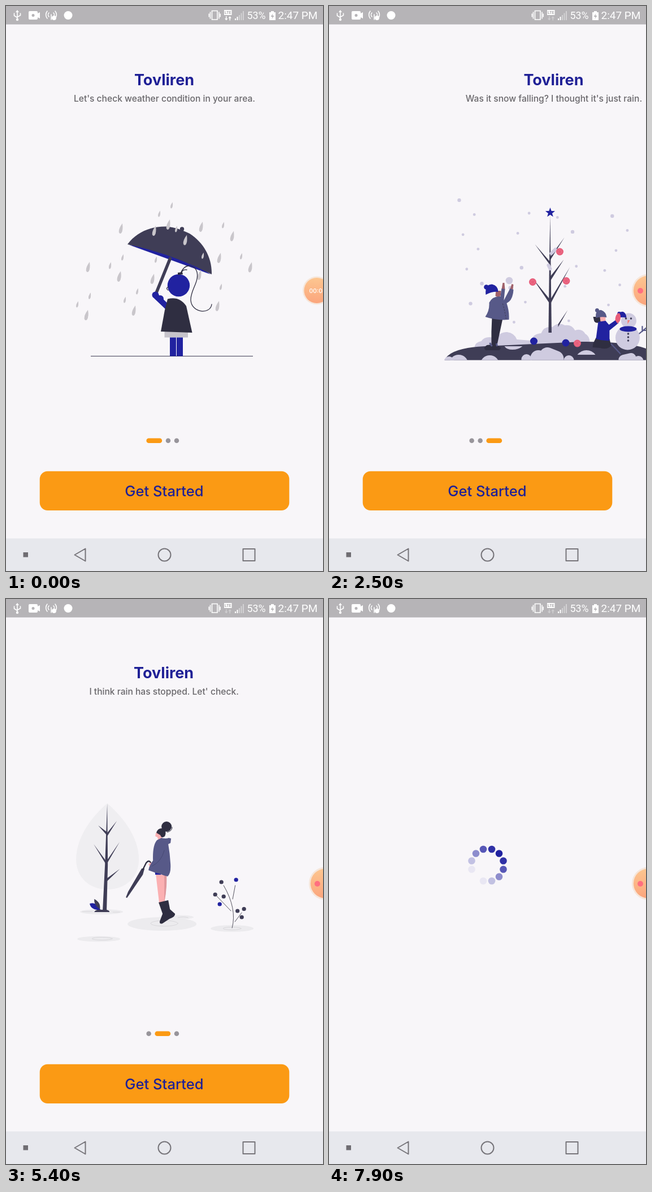
Recreate the animation shown at these times as an HTML page. Size 561 px wide and 998 px high, loop 8000 ms.

```html
<!DOCTYPE html>
<html lang="en">
<head>
<meta charset="utf-8">
<title>Weather onboarding</title>
<style>
html, body { margin: 0; width: 100%; height: 100%; overflow: hidden; background: #f8f6f9; }
svg { display: block; width: 100vw; height: 100vh; }
text { font-family: Inter, "Open Sans", sans-serif; font-weight: 500; text-anchor: middle; }
.title { font-size: 27px; font-weight: 700; fill: #1f2096; }
.sub { font-size: 15.6px; fill: #69676b; }
.cta { font-size: 25.6px; fill: #1f2096; }
.clock text { font-family: Roboto, sans-serif; font-weight: 400; text-anchor: start; fill: #fff; }
.blue { fill: #2122a0; }
.dark { fill: #2f2e41; }
.navy { fill: #3f3d56; }
.coat { fill: #575988; }
.snow { fill: #cfcbe0; }
.pink { fill: #e85e7b; }
.skin { fill: #fbb0b2; }
.brown { fill: #a0616a; }
.line { fill: none; stroke-linecap: round; }
</style>
</head>
<body>
<svg viewBox="0 0 561 998" preserveAspectRatio="none">
  <defs>
    <path id="drop" d="M3-9Q4.5 3 1.5 7.5Q-1.5 11-3.2 6.5Q-4 0 3-9Z"/>
    <use id="droplet" href="#drop" transform="scale(.6)"/>
    <g id="trio">
      <use href="#drop"/><use href="#droplet" x="6" y="-34"/><use href="#droplet" x="-16" y="-19"/>
    </g>
    <g id="cluster">
      <use href="#drop"/>
      <use href="#drop" x="55" y="16.5"/><use href="#droplet" x="39" y="-3"/>
      <use href="#drop" x="-3" y="85"/><use href="#droplet" x="3" y="51"/>
    </g>
    <g id="bauble">
      <circle class="pink" r="6.5"/>
      <circle r="3.5" fill="none" stroke="#f3a0b0" stroke-dasharray="1 2"/>
    </g>
    <linearGradient id="peach" x2="0" y2="1">
      <stop stop-color="#fdc690"/><stop offset="1" stop-color="#fba57d"/>
    </linearGradient>
    <clipPath id="ground"><rect y="330" width="561" height="295.5"/></clipPath>
  </defs>
  <rect width="561" height="998" fill="#f8f6f9"/>

  <g id="app">
    <g class="page">
      <text class="title" x="280" y="140">Tovliren</text>
      <text class="sub" x="280.5" y="168.5">Let's check weather condition in your area.</text>
      <path d="M150 618.5H437" stroke="#3f3d56" stroke-width="1.2"/>
      <path class="blue" d="M218 422L362 474Q300 430 218 422Z"/>
      <path class="navy" d="M215 421C231 399 256 389 284 389.5C300 391 312 396 325 402C350 418 365 445 364 474Q292 437 215 421Z"/>
      <circle class="navy" cx="311.5" cy="394" r="3.7"/>
      <path class="line" d="M290.5 446L265 509" stroke="#3f3d56" stroke-width="5.5"/>
      <g fill="#c9c6cb">
        <use href="#cluster" x="145" y="461"/><use href="#cluster" x="262" y="397"/>
        <use href="#cluster" x="345" y="390"/><use href="#cluster" x="377" y="445"/>
        <use href="#trio" x="142" y="546"/><use href="#trio" x="200" y="478"/>
        <use href="#trio" x="226" y="538"/><use href="#trio" x="287" y="386"/>
        <use href="#drop" x="203" y="393"/>
      </g>
      <path class="line" d="M266 513L286 532" stroke="#2122a0" stroke-width="10"/>
      <circle class="blue" cx="264.5" cy="510.5" r="6"/>
      <circle class="blue" cx="273" cy="517" r="6"/>
      <rect x="280.5" y="574" width="41.5" height="11.5" fill="#c6c3cb"/>
      <path class="blue" d="M290 585.5h11v33h-11zM302 585.5h11v33h-11z"/>
      <path class="dark" d="M286 517.5Q307 512 319 530L329.500 577L274 575L281 537Z"/>
      <circle class="blue" cx="305.5" cy="493.5" r="19.7"/>
      <path class="line" d="M287 496q-5 3 0 6M309 473C314 455 333 454 338 470C342 488 326 502 327 520C329 543 362 545 364 527M311 471Q312 465 320 466" stroke="#2f2e41" stroke-width="1.3"/>
      <path class="dark" d="M304 471l8-1 1 4-9 1z"/>
    </g>

    <g class="page">
      <text class="title" x="280" y="140">Tovliren</text>
      <text class="sub" x="280.5" y="168.5">I think rain has stopped. Let' check.</text>
      <path d="M180 361C206 383 236 420 236 460C236 492 212 513 180 513C149 513 125 492 125 460C125 420 154 383 180 361Z" fill="#efeef1"/>
      <g fill="#ecebee">
        <ellipse cx="170" cy="552.5" rx="38" ry="4.5"/>
        <ellipse cx="165" cy="600.5" rx="38" ry="5"/>
        <ellipse cx="277" cy="574" rx="61" ry="12"/>
        <ellipse cx="309" cy="562" rx="24" ry="3.5"/>
        <ellipse cx="401" cy="582" rx="38" ry="6"/>
      </g>
      <g class="line" stroke="#d3d2d6" stroke-width=".8">
        <ellipse cx="171" cy="600" rx="18" ry="2.5"/>
        <ellipse cx="281" cy="573" rx="24" ry="5"/>
        <ellipse cx="401" cy="582" rx="16" ry="2.5"/>
        <path d="M136 552h17M190 553h12M305 563q10-3 18 0"/>
      </g>
      <path class="navy" d="M180 361L181 470L179 549Q184 550 184 553H157Q160 547 172 549L176 470Z"/>
      <path class="navy" d="M180 413l17-21-17 27zM180 412l-16-12 16 18zM178 464l24-35-24 41zM178 463l-22-30 22 36zM176 496l26-19-26 25z"/>
      <path class="blue" d="M149 538Q161 534 168 549Q151 550 149 538Z"/>
      <path class="navy" d="M157 530Q169 536 167 548Q156 541 157 530Z"/>

      <path class="navy" d="M213 527L217 517L241 476L246 476L243 487L224 515L215 528Z"/>
      <path class="line" d="M243 478L249 466Q254 460 257 466" stroke="#2f2e41" stroke-width="2.3"/>
      <path class="skin" d="M266 486L285 488Q285 510 281 537H272Q269 512 266 486ZM253 468l6-3 4 6-7 4z"/>
      <path d="M281 489l4 0Q286 512 281 536Z" fill="#df989d"/>
      <path class="blue" d="M264 478h11v9h-10z"/>
      <path class="skin" d="M266 413h11v12h-7l-1-4-4-2z"/>
      <path class="coat" d="M268 426L276 422Q284 424 289 422L293 423L292 431L288 433Q291 450 292 468Q293 485 287 490Q281 489 272 485Q262 483 253 479Q254 471 261 462Q260 435 268 426Z"/>
      <path class="line" d="M281 444Q276 464 259 472" stroke="#474975"/>
      <circle class="dark" cx="285" cy="402" r="9"/>
      <path class="dark" d="M267 413Q269 404 279 405Q286 410 282 419Q276 424 274 417Z"/>
      <path class="line" d="M295 403q0 7-9 9" stroke="#2f2e41"/>
      <path class="dark" d="M271 536L288 532L291 548L300 556Q301 561 290 565L278 573Q272 575 273 569L278 556Z"/>

      <path class="line" d="M401 581Q410 547 386 506M399 551L374 525M402 530L406.5 506M406 570L418 554" stroke="#55535f"/>
      <g class="line" stroke-width="7.2">
        <path d="M382 500h.1M371 522h.1M386 525.5h.1M410.5 551h.1M422 547.5h.1M418 562h.1" stroke="#3f3d56"/>
        <path d="M408 496h.1M379 539h.1" stroke="#2122a0"/>
      </g>
    </g>

    <g class="page">
      <text class="title" x="280" y="140">Tovliren</text>
      <text class="sub" x="280.5" y="168.5">Was it snow falling? I thought it's just rain.</text>
      <g id="flakes" class="snow"></g>
      <g clip-path="url(#ground)">
        <path class="snow" d="M140 603Q141 594 152 592Q159 581 178 587Q186 575 198 576Q211 578 215 589L240 591Q244 579 258 578Q263 565 278 567Q288 558 300 564Q312 562 318 573Q330 569 336 579Q346 584 344 603Z"/>
        <path class="navy" d="M87 626Q96 604 158 601L330 593Q455 592 474 626Z"/>
        <path class="snow" d="M193 601h32q-7 6-18 6-10 0-14-6zM322 616q7-8 16-8 10 0 16 8z"/>
        <g class="line" stroke="#cfcbe0">
          <path d="M112 633h.1M167 634h.1" stroke-width="34"/>
          <path d="M269 617l15 6M253 622h.1" stroke-width="28"/>
          <path d="M404 625l13-3M430 627h.1M232 624h.1M307 626h.1M95 628h.1" stroke-width="18"/>
        </g>
      </g>
      <path class="navy" d="M274 370L276.5 577H271L272.5 450Z"/>
      <path class="navy" d="M274 443l25-34-25 40zM274 452l-27-31 27 37zM274 478l24-30-24 38zM274 519l35-58-35 66zM274 519l-31-38 31 46zM288 562l17-25-17 30z"/>
      <path class="line" d="M276 437l7-7M271 458l3 6" stroke="#cfcbe0" stroke-width="6"/>
      <path class="blue" id="star"/>
      <use href="#bauble" x="291" y="434"/><use href="#bauble" x="243" y="487.5"/>
      <use href="#bauble" x="302.5" y="485.5"/><use href="#bauble" x="322" y="596"/>
      <path class="line" d="M245 592h.1M301.5 595h.1" stroke="#2122a0" stroke-width="13"/>

      <path class="dark" d="M171 550L190 552L184 580L180 599L187 604L184 608L160 608Q154 604 162 599L170 598L170 575Z"/>
      <path d="M167 595l4 6M179 596l1 5" stroke="#575988" stroke-width="3"/>
      <path class="brown" d="M188 501l2-12 3 0 1 12zM203 500l3-9 3 1-1 9zM178 503h9v8l-5 4-5-3z"/>
      <path class="coat" d="M166 524Q172 512 186 513L188 499L194 500L192 520L203 499L209 501Q208 520 197 525Q202 540 201 554Q179 556 159 549Q167 538 166 524Z"/>
      <path class="line" d="M190 526Q194 540 196 553" stroke="#3f3d56" stroke-dasharray="2 3"/>
      <path class="blue" d="M160 510Q158 492 171 491.5Q182 494 182 505Q171 504 160 510Z"/>
      <circle class="blue" cx="161" cy="496.5" r="4.3"/>
      <circle class="snow" cx="201.5" cy="485" r="6.3"/>

      <path class="line" d="M430 580L447 566M437 575v-9M438 573l9 0M398 614L382 597" stroke="#575988" stroke-width="2.2"/>
      <circle class="snow" cx="411" cy="586" r="21.5"/>
      <circle class="snow" cx="413" cy="556" r="13.5"/>
      <ellipse class="blue" cx="412" cy="570.5" rx="15" ry="5"/>
      <path class="blue" d="M394 552Q392 539 403 540Q409 543 409 551Q400 548 394 552Z"/>
      <circle class="blue" cx="396" cy="543" r="3"/>
      <path class="line" d="M408 552h.1M417 552h.1M412 579h.1M412 585h.1M412 591h.1" stroke="#3f3d56" stroke-width="3.5"/>
      <path d="M411 555h4l-4 7z" fill="#ff7a70"/>
      <path class="dark" d="M355 586L379 588L382 600Q375 608 362 604L349 603L350 596ZM350 549h14v9q-9 4-12-1z"/>
      <path class="skin" d="M362 549h10v7q-5 3-9 1z"/>
      <path class="blue" d="M359 558L372 556L378 563L391 554L395 560L379 573V591Q367 592 355 588Z"/>
      <path class="pink" d="M389 555Q389 544 396 542Q401 548 397 557L393 561Z"/>
      <path class="coat" d="M355 551Q353 537 364 537Q373 540 374 550Q364 548 355 551Z"/>
      <circle class="coat" cx="357" cy="537.5" r="3.5"/>
    </g>

    <g id="dots"></g>
    <rect x="59.7" y="821.7" width="441.6" height="69.4" rx="14" fill="#fb9a14"/>
    <text class="cta" x="280" y="865.5">Get Started</text>
  </g>

  <g id="loader" transform="translate(280.5 470)"></g>

  <g id="bubble">
    <circle r="25" fill="#f6e6da"/>
    <circle r="22.5" fill="url(#peach)"/>
  </g>
  <text id="timer" x="551.5" y="507" font-size="10.5" fill="#fff"></text>
  <circle id="rec" cx="551" cy="503" r="5" fill="#ff6f80"/>

  <rect width="561" height="32.5" fill="#b6b4b7"/>
  <g class="line" stroke="#fff" stroke-width="1.6">
    <path d="M20 9V24M14.5 13v4l5.5 3.5M25.5 13v3.5L20 19.5"/>
    <path d="M80 15v9M76 12a5 5 0 0 0 0 7M84 12a5 5 0 0 1 0 7M73 9a10 10 0 0 0 0 13M87 9a10 10 0 0 1 0 13"/>
    <path d="M364.5 8.5h9.5v15.5h-9.5zM361.5 11v11M377 11v11M359.3 14v5M379.2 14v5"/>
  </g>
  <g fill="#fff">
    <circle cx="20" cy="24" r="2.2"/><path d="M17 11l3-4 3 4z"/>
    <path d="M42 9h12q2 0 2 2v2l4-2v11l-4-2v2q0 2-2 2H42q-2 0-2-2V11q0-2 2-2z"/>
    <circle cx="85" cy="21" r="4"/>
    <circle cx="110" cy="16.5" r="7.5"/>
    <rect x="386" y="7" width="13.5" height="9"/>
    <path id="arrows" d="M389 18h1.5v4h2l-2.7 3.5-2.8-3.5h2zM395.5 25.5v-4h-2l2.7-3.5 2.8 3.5h-2v4z"/>
    <path d="M405 22h2v3h-2zM408.5 19h2v6h-2z"/>
    <path d="M412 16h2v9h-2zM415.5 12.5h2v12.5h-2zM419 9h2v16h-2z" opacity=".4"/>
    <path d="M469 9h5v2h3v14h-11V11h3z"/>
  </g>
  <circle cx="48" cy="16.5" r="2.5" fill="#b6b4b7"/>
  <path d="M472.5 13l-4 6h3l-1 4 4-6h-3z" fill="#b6b4b7"/>
  <text x="392.8" y="14.2" font-size="6.5" style="font-weight:700" fill="#aaa8ab">LTE</text>
  <g class="clock">
    <text x="426.5" y="23" font-size="17.8">53%</text>
    <text x="481.5" y="23" font-size="19">2:47 PM</text>
  </g>

  <rect y="940.5" width="561" height="58" fill="#e7e8ed"/>
  <rect x="30.5" y="965" width="8.5" height="8.5" fill="#6f6d72"/>
  <g class="line" stroke="#77757a" stroke-width="2" stroke-linejoin="round">
    <path d="M121.5 969.5L140.500 958.5V980.5ZM419.500 959h21v21h-21z"/>
    <circle cx="280.5" cy="969.5" r="11"/>
  </g>
</svg>
<script>
const $ = id => document.getElementById(id);
const repeat = (n, make) => Array.from({length: n}, (_, i) => make(i));
const clamp = v => Math.max(0, Math.min(1, v));
const smooth = v => v * v * (3 - 2 * v);

// Evenly scattered flakes, every third one larger
$('flakes').innerHTML = repeat(26, i =>
  `<circle cx="${113 + 341 * (i * .7549 % 1)}" cy="${343 + 218 * (i * .5698 % 1)}" r="${i % 3 ? 2.4 : 3.2}"/>`).join('');

$('star').setAttribute('d', 'M' + repeat(10, i => {
  const a = i * Math.PI / 5, r = i % 2 ? 3.7 : 9;
  return `${274 + r * Math.sin(a)} ${365 - r * Math.cos(a)}`;
}).join('L') + 'Z');

$('dots').innerHTML = '<rect y="763.5" height="8.5" rx="4.25"/>'.repeat(3);
$('loader').innerHTML = repeat(12, i => {
  const a = (i * 30 - 75) * Math.PI / 180;
  return `<circle class="blue" cx="${29 * Math.cos(a)}" cy="${29 * Math.sin(a)}" r="6.3"/>`;
}).join('');

const pages = document.querySelectorAll('.page');
const dots = [...$('dots').children], spins = [...$('loader').children];
const SWIPES = [450, 2181, 2840, 3560, 4600, 5393], SWIPE_TIME = 700;
const TAP = 6950, LOOP = 8000;

// Swipes walk the pages back and forth: 0 1 2 1 0 1 2
function pageAt(t) {
  const walked = SWIPES.reduce((sum, start) =>
    sum + smooth(1 - (1 - clamp((t - start) / SWIPE_TIME)) ** 2), 0);
  return 2 - Math.abs(2 - walked % 4);
}

function draw(t) {
  const pos = pageAt(t);
  pages.forEach((g, i) => g.setAttribute('transform', `translate(${(i - pos) * 561} 0)`));

  let x = 248.4;
  dots.forEach((dot, i) => {
    const on = i === Math.round(pos), w = on ? 27.8 : 8.5;
    dot.setAttribute('x', x);
    dot.setAttribute('width', w);
    dot.setAttribute('fill', on ? '#fb9a14' : '#98959b');
    x += w + 6.5;
  });

  const loading = t >= TAP;
  $('app').style.display = loading ? 'none' : '';
  $('loader').style.display = loading ? '' : 'none';
  const peak = 1 + (t - 7900) / 100;
  spins.forEach((c, i) => c.setAttribute('opacity', (1 + Math.cos((i - peak) * Math.PI / 6)) / 2));

  const hide = smooth(clamp((t - 1900) / 300));
  $('bubble').setAttribute('transform', `translate(${550 + 15 * hide} 502.5) scale(${1 + .16 * hide})`);
  $('timer').textContent = t < 700 ? '00:03' : '00:04';
  $('timer').setAttribute('opacity', 1 - hide);
  $('rec').setAttribute('opacity', hide);
  $('arrows').setAttribute('opacity', t < 500 || t >= 3900 && t < 4450 ? 1 : .35);
}

const begin = performance.now();
(function tick() {
  draw((performance.now() - begin) % LOOP);
  requestAnimationFrame(tick);
})();
</script>
</body>
</html>
```
